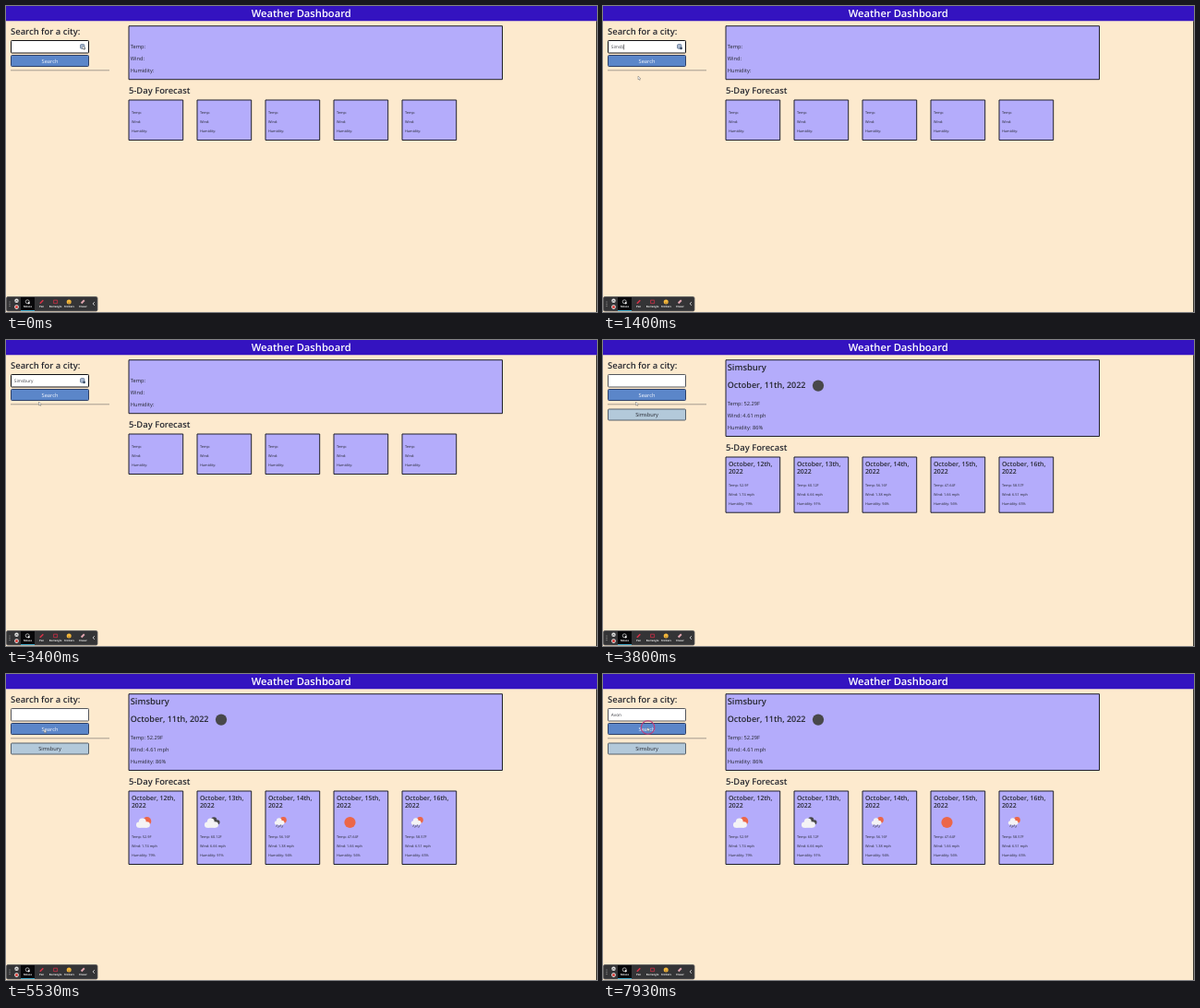
These frames come from a looping animation (640x332 px, 8000 ms). An HTML page with a canvas:

```html
<!DOCTYPE html>
<html lang="en">
<head>
<meta charset="utf-8">
<title>Weather Dashboard</title>
<style>
html, body { margin: 0; width: 100%; height: 100%; overflow: hidden; background: #fdeace; }
canvas { display: block; width: 640px; height: 332px; }
</style>
</head>
<body>
<canvas id="stage"></canvas>
<script>
const W = 640, H = 332, LOOP = 8000;
const canvas = document.getElementById('stage');
const ctx = canvas.getContext('2d');
const ratio = window.devicePixelRatio || 1;
canvas.width = W * ratio;
canvas.height = H * ratio;

const INK = '#24262e', CARD = '#b4acfb', SUN = '#ec6648', DARK = '#48484a';
const RESULTS = 3460, ICONS = 3930;
const KEYS = [
  [930, 'S'], [1060, 'Si'], [1130, 'Sim'], [1260, 'Sims'], [1330, 'Simsb'],
  [1800, 'Simsbu'], [2130, 'Simsbur'], [2400, 'Simsbury'], [RESULTS, ''],
  [6130, 'A'], [6260, 'Av'], [6660, 'Avo'], [6800, 'Avon']
];
// time, x, y of the pointer tip
const PATH = [
  [0, 83, 43], [60, 83, 43], [800, 38, 76], [1800, 38, 76], [2460, 35.5, 67],
  [3930, 35.5, 67], [4400, 8.5, 188.5], [4800, 8.5, 188.5], [4860, 10, 184],
  [5260, 10, 184], [5600, 45, 45], [7130, 45, 45], [7530, 48, 58], [8000, 48, 58]
];
const DAYS = [
  ['October, 12th,', '52.9F', '1.74 mph', '79%', 'sunCloud'],
  ['October, 13th,', '60.12F', '6.66 mph', '91%', 'clouds'],
  ['October, 14th,', '56.16F', '1.38 mph', '94%', 'rain'],
  ['October, 15th,', '47.64F', '1.66 mph', '56%', 'sun'],
  ['October, 16th,', '58.57F', '6.51 mph', '65%', 'rain']
];

function text(str, x, y, size, weight = 400, color = INK, align = 'left') {
  ctx.font = `${weight} ${size}px "Open Sans", "Noto Sans", sans-serif`;
  ctx.fillStyle = color;
  ctx.textAlign = align;
  ctx.fillText(str, x, y);
}

function rect(x, y, w, h, fill, stroke, r = 0, line = 1) {
  ctx.beginPath();
  ctx.roundRect(x, y, w, h, r);
  ctx.fillStyle = fill;
  ctx.fill();
  if (stroke) {
    ctx.strokeStyle = stroke;
    ctx.lineWidth = line;
    ctx.stroke();
  }
}

function dot(x, y, r, color) {
  ctx.beginPath();
  ctx.arc(x, y, r, 0, Math.PI * 2);
  ctx.fillStyle = color;
  ctx.fill();
}

function lines(points, color, width) {
  ctx.beginPath();
  points.forEach(([x, y], i) => i ? ctx.lineTo(x, y) : ctx.moveTo(x, y));
  ctx.strokeStyle = color;
  ctx.lineWidth = width;
  ctx.stroke();
}

function cloud(x, y, s, color) {
  dot(x - 5 * s, y + 2.3 * s, 3.4 * s, color);
  dot(x - 1 * s, y - 1.2 * s, 4.3 * s, color);
  dot(x + 4.2 * s, y + 2 * s, 3.6 * s, color);
  rect(x - 5 * s, y + 1 * s, 9.2 * s, 4.7 * s, color);
}

const icons = {
  sun: (x, y) => dot(x, y, 6.1, SUN),
  sunCloud(x, y) {
    dot(x + 4, y - 1.3, 4.6, SUN);
    cloud(x, y + 0.6, 0.92, '#f4f3f5');
  },
  clouds(x, y) {
    cloud(x + 3.2, y - 1.7, 0.72, DARK);
    cloud(x, y + 0.6, 0.92, '#f4f3f5');
  },
  rain(x, y) {
    dot(x + 3.7, y - 2.5, 3.4, SUN);
    cloud(x - 0.3, y - 1, 0.66, '#f4f3f5');
    for (let i = 0; i < 4; i++) {
      const dx = x - 3 + i * 2, dy = y + 2.4 + (i % 2);
      lines([[dx, dy], [dx - 1, dy + 2.4]], '#55555c', 0.8);
    }
  }
};

function readings(x, y, step, size, values) {
  ['Temp:', 'Wind:', 'Humidity:'].forEach((label, i) =>
    text(values ? `${label} ${values[i]}` : label, x, y + i * step, size));
}

function drawSearch(t) {
  const focused = t < RESULTS || (t >= 5730 && t < 7860);
  let typed = '', last = -530;
  for (const [time, value] of KEYS) if (t >= time) [last, typed] = [time, value];

  text('Search for a city:', 5, 31.4, 9.45, 600);
  rect(5.5, 37.5, 84, 13.5, '#fff', focused ? '#101014' : '#55575c', 0.8);
  text(typed, 8.8, 46, 4.75, 400, '#3c3d44');
  if (focused) {
    if ((t - last) % 1060 < 530) {
      const x = 9.2 + ctx.measureText(typed).width;
      lines([[x, 41.6], [x, 47.4]], '#222', 0.6);
    }
    rect(80.5, 41.6, 4.4, 4.6, '#a9b8d0', '#526887', 1, 0.7);
    dot(84.6, 45.9, 1.3, '#35465f');
  }
  rect(5.5, 53.5, 84, 12, '#5b86c9', '#2d4068', 1);
  text('Search', 47.5, 61.6, 5.7, 400, '#f4f7ff', 'center');
  lines([[5, 69.8], [112, 69.8]], '#8f8980', 0.8);
  if (t >= RESULTS) {
    rect(5.5, 75, 84, 12, '#b3c9da', '#56616b', 1);
    text('Simsbury', 47.5, 83.2, 5.7, 400, INK, 'center');
  }
}

function drawWeather(t) {
  const found = t >= RESULTS, loaded = t >= ICONS;
  rect(133, 21.7, 404.5, found ? 82.8 : 58, CARD, '#20202c');
  if (found) {
    text('Simsbury', 134.7, 33.2, 9.4, 600);
    text('October, 11th, 2022', 134.7, 52.2, 9, 600);
    dot(233, 49.6, 6.1, DARK);
  }
  readings(134.7, found ? 71.2 : 46.2, 13, 5.7, found && ['52.29F', '4.61 mph', '86%']);
  text('5-Day Forecast', 133, found ? 119.9 : 94.8, 9.4, 600);

  DAYS.forEach(([date, temp, wind, humidity, icon], i) => {
    const x = 133 + i * 74;
    const top = found ? 127 : 102;
    const height = !found ? 43.5 : loaded ? 79.5 : 60.2;
    rect(x, top, 58.7, height, CARD, '#20202c');
    if (found) {
      text(date, x + 2.9, 137, 6.9, 600);
      text('2022', x + 2.9, 145.2, 6.9, 600);
    }
    if (loaded) icons[icon](x + 15.7 + (icon === 'sun' ? 1.8 : 0), 161);
    const y = !found ? 117.4 : loaded ? 178.3 : 159;
    readings(x + 2.9, y, 10, 3.83, found && [temp, wind, humidity]);
  });
}

function drawToolbar() {
  rect(0.5, 315.5, 98.5, 15.5, '#343436', '#59595b', 1.5, 0.8);
  rect(16, 316, 15, 15, '#08080a');
  rect(16, 330, 15, 1, '#3da7c9');
  for (let i = 0; i < 3; i++) dot(4, 321 + i * 2.3, 0.6, '#aaa');
  dot(11.5, 319.8, 2.2, '#e4e4e4');
  lines([[10.6, 318.9], [12.4, 320.7]], '#333', 0.6);
  lines([[12.4, 318.9], [10.6, 320.7]], '#333', 0.6);
  dot(11.5, 326.6, 2.3, '#eee');
  dot(11.5, 326.6, 1.5, '#d83a35');

  ['Mouse', 'Pen', 'Rectangle', 'Stickers', 'Eraser'].forEach((name, i) =>
    text(name, 23.5 + i * 15, 327.2, 2.75, 700, '#f2f2f2', 'center'));
  ctx.beginPath();
  ctx.arc(23.2, 320.8, 2, 0, Math.PI * 2);
  ctx.strokeStyle = '#ddd';
  ctx.lineWidth = 0.7;
  ctx.stroke();
  dot(24.7, 322.3, 1.1, '#fff');
  lines([[36.8, 322.8], [40.3, 319.2]], '#d63348', 1.6);
  rect(51.6, 319.2, 4, 3.5, '#343436', '#cf3047', 0, 0.8);
  dot(68.2, 320.9, 2.5, '#f4b83c');
  lines([[67, 321.6], [68.2, 322.3], [69.4, 321.6]], '#6b4514', 0.5);
  lines([[81.6, 322.5], [84.8, 319.3]], '#e2a6b0', 2);
  lines([[95.8, 321.2], [94.2, 323], [95.8, 324.8]], '#eee', 0.8);
}

function pointerAt(t) {
  const i = Math.max(1, PATH.findIndex(p => p[0] > t));
  const [t0, x0, y0] = PATH[i - 1], [t1, x1, y1] = PATH[i];
  const k = (t - t0) / (t1 - t0), e = k * k * (3 - 2 * k);
  return [x0 + (x1 - x0) * e, y0 + (y1 - y0) * e];
}

function drawPointer(t) {
  if (t >= 5930 && t < 7130) return;
  const [x, y] = pointerAt(t);
  if ((t >= 5730 && t < 5930) || t >= 7860) {
    ctx.beginPath();
    ctx.arc(x + 0.6, y, 7.3, 0, Math.PI * 2);
    ctx.strokeStyle = '#c43c78';
    ctx.lineWidth = 1.1;
    ctx.stroke();
  }
  ctx.beginPath();
  ctx.moveTo(x, y);
  ctx.lineTo(x, y + 3.9);
  ctx.lineTo(x + 0.9, y + 3.1);
  ctx.lineTo(x + 1.6, y + 4.5);
  ctx.lineTo(x + 2.2, y + 4.2);
  ctx.lineTo(x + 1.6, y + 2.9);
  ctx.lineTo(x + 2.8, y + 2.8);
  ctx.closePath();
  ctx.fillStyle = '#fff';
  ctx.fill();
  ctx.strokeStyle = '#66625e';
  ctx.lineWidth = 0.45;
  ctx.stroke();
}

function draw(t) {
  ctx.setTransform(ratio, 0, 0, ratio, 0, 0);
  ctx.textRendering = 'geometricPrecision';
  rect(0, 0, W, H, '#fdeace');
  rect(0, 0, W, 16.3, '#3413c0');
  rect(639, 16.3, 1, H, '#39352f');
  text('Weather Dashboard', 319.7, 11.7, 11.2, 600, '#fff', 'center');
  drawSearch(t);
  drawWeather(t);
  drawToolbar();
  drawPointer(t);
}

const start = performance.now();
function tick() {
  draw((performance.now() - start) % LOOP);
  requestAnimationFrame(tick);
}
tick();
</script>
</body>
</html>
```
